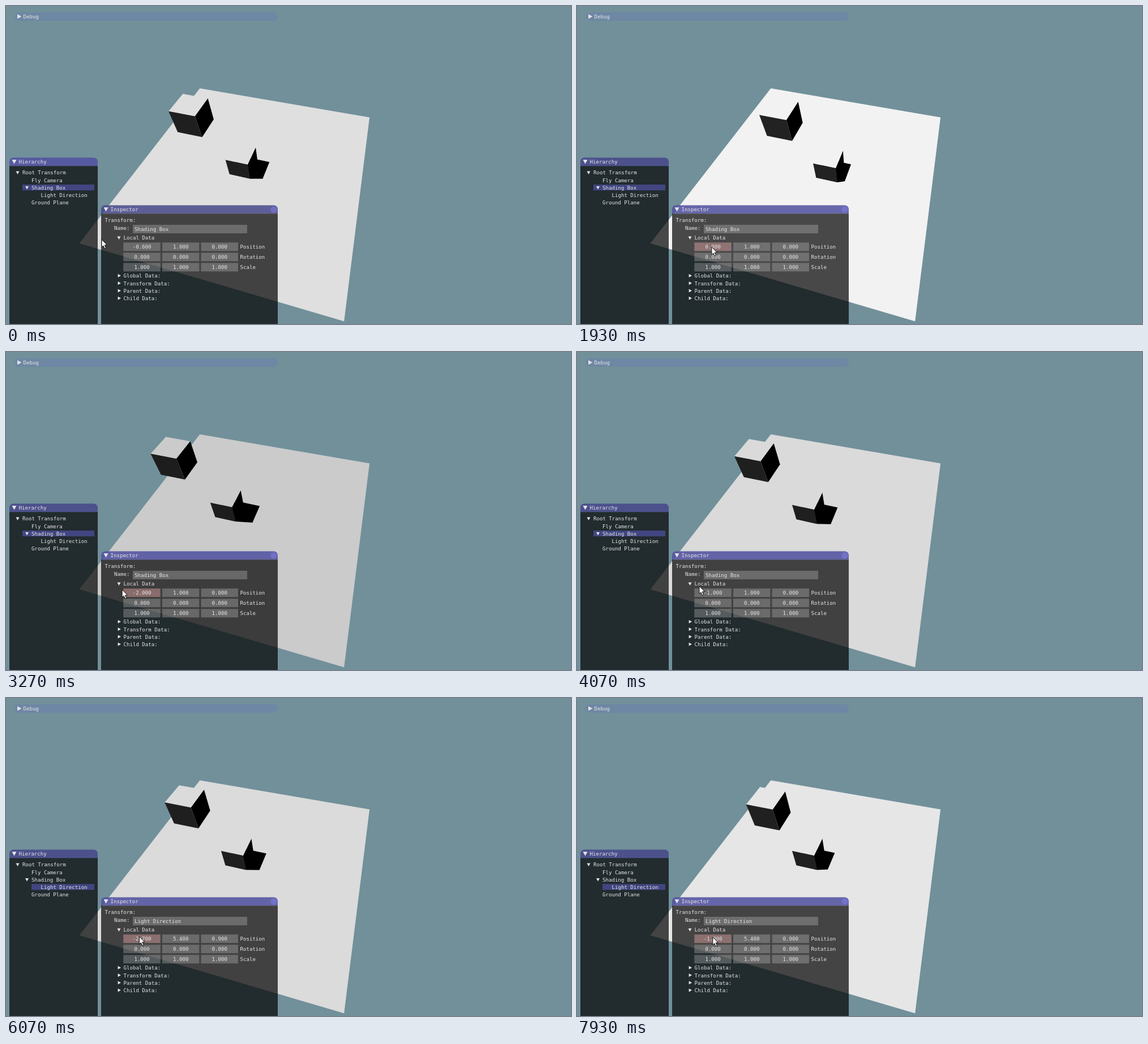
Recreate the animation shown at these times as an HTML page with a canvas. Size 998x561 px, loop 8000 ms.

```html
<!DOCTYPE html>
<html>
<head>
<meta charset="utf-8">
<style>
html, body { margin: 0; width: 100%; height: 100%; overflow: hidden; background: #71909a; }
canvas { display: block; }
</style>
</head>
<body>
<canvas id="stage" width="998" height="561"></canvas>
<script>
const ctx = document.getElementById('stage').getContext('2d');
const LOOP = 8000, GRAB_BOX = 1260, DROP_BOX = 4060, SELECT_LIGHT = 4590, GRAB_LIGHT = 5320;
const FIELD = 'rgba(204,204,204,.3)';
const { sin, cos, PI } = Math;

// Eases through rows of [time, value...]
function follow(keys, t) {
  const i = keys.findIndex(k => k[0] > t);
  if (i < 1) return keys.at(i).slice(1);
  const a = keys[i - 1], b = keys[i];
  const f = .5 - .5 * cos(PI * (t - a[0]) / (b[0] - a[0]));
  return a.slice(1).map((v, n) => v + (b[n + 1] - v) * f);
}
const boxAt = t => follow([[1267, -.6], [1620, -.5], [2330, 2.9], [3333, -2.1], [3400, -2.1], [3870, -1]], t)[0];
const lightAt = t => follow([[5330, -2.8], [5730, -3.8], [7160, 4.6], [7933, -1.9]], t)[0];
const tenth = v => Math.round(v * 10) / 10;

// While dragging, the hand runs slightly ahead of the value
function mouseAt(t) {
  if (t > GRAB_LIGHT) {
    const x = 255 + 8 * lightAt(t + 40);
    return [x, 421 + (x - 236) * .26];
  }
  if (t > GRAB_BOX && t < DROP_BOX) {
    return [226 + 10 * boxAt(t + 40), 426 - 13 * ((t - GRAB_BOX) / 2800) ** 2];
  }
  return follow(t < GRAB_BOX
    ? [[0, 169, 412], [200, 150, 407], [400, 150, 407], [1200, 219, 425]]
    : [[4067, 216, 413], [4600, 100, 331], [4870, 100, 331], [5300, 232, 420]], t);
}

const yaw = 15 * PI / 180, pitch = 51.2 * PI / 180, focal = 280.5 / Math.tan(PI / 6);
function project([x, y, z]) {
  const side = x * cos(yaw) - z * sin(yaw), ahead = x * sin(yaw) + z * cos(yaw);
  const depth = 25.18 - ahead * cos(pitch) - y * sin(pitch);
  return [499.4 + focal * (side - 3.548) / depth,
    280.9 + focal * (.373 + ahead * sin(pitch) - y * cos(pitch)) / depth];
}

function poly(points, fill) {
  ctx.beginPath();
  points.forEach(p => ctx.lineTo(...p));
  ctx.closePath();
  ctx.fillStyle = fill;
  ctx.fill();
}
const face = (points, fill) => poly(points.map(project), fill);
const square = (x, y, z, r) => [[x - r, y, z - r], [x + r, y, z - r], [x + r, y, z + r], [x - r, y, z + r]];

function scene(boxX, lightX) {
  const light = [boxX + lightX, 6.4, .9], len = Math.hypot(...light);
  const [right, top, front] = light.map(c => {
    const v = Math.round(255 * Math.max(0, c / len));
    return `rgb(${v},${v},${v})`;
  });
  const cube = (x, y, z) => {
    const lo = square(x, y - 1, z, 1), hi = square(x, y + 1, z, 1);
    face(hi, top);
    face([hi[1], hi[2], lo[2], lo[1]], right);
    face([hi[3], hi[2], lo[2], lo[3]], front);
  };

  face(square(0, 0, 0, 10), top);
  // Sweep of the box footprint away from the light
  const near = square(boxX, 0, 0, 1);
  const far = square(boxX - light[0] * 2 / 6.4, 0, -light[2] * 2 / 6.4, 1);
  face(light[0] < 0 ? [near[0], far[0], far[1], far[2], near[2], near[3]]
    : [near[1], far[1], far[0], far[3], near[3], near[2]], '#000');
  cube(boxX, 1, 0);
  cube(...light);
}

function rect(x, y, w, h, fill, radii = 0) {
  ctx.beginPath();
  ctx.roundRect(x, y, w, h, radii);
  ctx.fillStyle = fill;
  ctx.fill();
}

function text(s, x, y, align = 'left') {
  ctx.font = '9.1px "DejaVu Sans Mono", monospace';
  ctx.textAlign = align;
  ctx.fillStyle = '#e6e6e6';
  ctx.fillText(s, x, y + 3.3);
}

function arrow(x, y, open, r = 3) {
  poly(open ? [[x - r, y - r * .8], [x + r, y - r * .8], [x, y + r]]
    : [[x - r * .8, y - r], [x + r, y], [x - r * .8, y + r]], '#e6e6e6');
}

function panel(title, x, y, w, active) {
  rect(x, y, w, 14.9, active ? 'rgba(82,82,161,.87)' : 'rgba(69,69,138,.83)', [7, 7, 0, 0]);
  rect(x, y + 14.9, w, 561 - y, 'rgba(0,0,0,.7)');
  arrow(x + 8.5, y + 7, true, 4);
  text(title, x + 16.5, y + 7.6);
}

function hierarchy(lightSelected, active, hover) {
  panel('Hierarchy', 6, 267.4, 156, active);
  const left = lightSelected ? 45 : 29;
  rect(left, lightSelected ? 328.3 : 315, 156 - left, 10.2,
    hover ? 'rgba(115,115,230,.8)' : 'rgba(102,102,230,.45)');
  arrow(20.5, 294, true);
  arrow(37, 320.5, true);
  [['Root Transform', 29], ['Fly Camera', 45], ['Shading Box', 45], ['Light Direction', 61.5], ['Ground Plane', 45]]
    .forEach(([s, x], i) => text(s, x, 294 + i * 13.25));
}

function inspector(name, position, active, cell) {
  panel('Inspector', 168, 351.4, 312, active);
  ctx.beginPath();
  ctx.arc(473, 359, 5.8, 0, 7);
  ctx.fillStyle = 'rgba(128,128,230,.5)';
  ctx.fill();
  text('Transform:', 174.5, 378);
  text('Name:', 191, 391.5);
  rect(224, 386, 202, 14.9, FIELD);
  text(name, 227, 393.5);
  arrow(199.5, 409, true);
  text('Local Data', 207.5, 409);
  [['Position', position], ['Rotation', [0, 0, 0]], ['Scale', [1, 1, 1]]].forEach(([label, values], row) => {
    const y = 417.3 + row * 18;
    values.forEach((v, col) => {
      const x = 207.3 + col * 68.6;
      rect(x, y, 65.5, 14.9, row + col ? FIELD : cell);
      text(v.toFixed(3), x + 32.8, y + 7.6, 'center');
    });
    text(label, 413.5, y + 7.6);
  });
  ['Global', 'Transform', 'Parent', 'Child'].forEach((s, i) => {
    const y = 476 + i * 13.3;
    arrow(200, y - .3, false);
    text(s + ' Data:', 207.5, y);
  });
}

function cursor(x, y) {
  const shape = [[0, 0], [0, 13.5], [3, 10.8], [5.3, 16], [7.6, 15], [5.3, 9.9], [9.4, 9.6]];
  poly(shape.map(p => [x + p[0], y + p[1]]), '#fff');
  ctx.strokeStyle = '#000';
  ctx.lineWidth = .9;
  ctx.stroke();
}

function draw(now) {
  // The picture ticks fifteen times a second
  const t = Math.floor((now % LOOP) * .015 + .1) / .015;
  const boxX = tenth(boxAt(t)), lightX = tenth(lightAt(t));
  const [mx, my] = mouseAt(t);
  const lightSelected = t > SELECT_LIGHT;
  const drag = t > GRAB_BOX && t < DROP_BOX || t > GRAB_LIGHT;
  const overCell = mx > 207 && mx < 273 && my > 417 && my < 432;
  const overRow = lightSelected && mx < 156 && my > 328 && my < 339;
  const cell = drag ? 'rgba(230,166,166,.45)' : overCell ? 'rgba(230,204,204,.4)' : FIELD;
  const treeActive = t < GRAB_BOX || lightSelected && t < GRAB_LIGHT;

  rect(0, 0, 998, 561, '#71909a');
  scene(boxX, lightX);
  rect(15, 11, 465, 15, 'rgba(102,102,204,.2)', 7);
  arrow(23.3, 18.5, false, 4);
  text('Debug', 30.5, 19);
  hierarchy(lightSelected, treeActive, overRow);
  inspector(lightSelected ? 'Light Direction' : 'Shading Box',
    lightSelected ? [lightX, 5.4, .9] : [boxX, 1, 0], !treeActive, cell);
  cursor(mx, my);
}

const start = performance.now();
function tick() {
  draw(performance.now() - start);
  requestAnimationFrame(tick);
}
tick();
</script>
</body>
</html>
```
